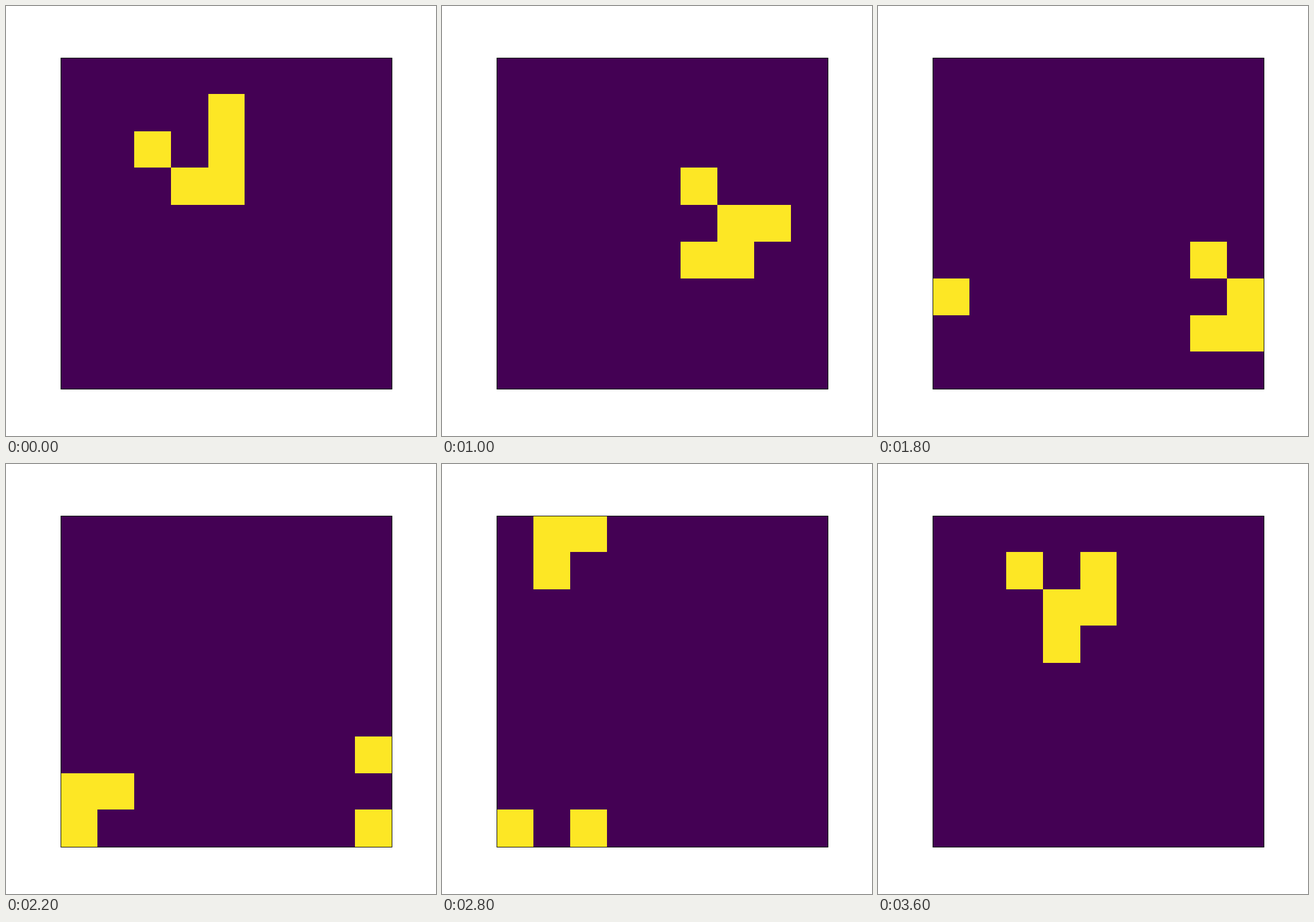
An HTML page for the animation above (3700 ms loop, 748x748 px).

```html
<!DOCTYPE html>
<html lang="en">
<head>
<meta charset="utf-8">
<title>Glider on a torus</title>
<style>
  html, body { margin: 0; width: 100%; height: 100%; overflow: hidden; background: #fff; }
  svg { display: block; width: 748px; height: 748px; }
</style>
</head>
<body>
<svg viewBox="0 0 748 748" shape-rendering="crispEdges">
  <rect x="95" y="90" width="577" height="577" fill="#000"/>
  <rect x="96" y="91" width="575" height="575" fill="#440154"/>
  <path id="cells" fill="#fde725"/>
</svg>
<script>
const SIZE = 9, STEP = 100, GENERATIONS = 36, LOOP = 3700;
const xs = [96, 159, 223, 287, 352, 415, 479, 543, 607, 671];
const ys = [91, 153, 218, 281, 346, 410, 474, 538, 601, 666];
const seed = [[1, 4], [2, 2], [2, 4], [3, 3], [3, 4]];
const cells = document.getElementById('cells');

const wrap = n => (n + SIZE) % SIZE;
const at = (grid, row, col) => grid[wrap(row) * SIZE + wrap(col)];

function evolve(grid) {
  return grid.map((alive, i) => {
    const row = Math.floor(i / SIZE), col = i % SIZE;
    let near = -alive;
    for (let dr = -1; dr <= 1; dr++)
      for (let dc = -1; dc <= 1; dc++) near += at(grid, row + dr, col + dc);
    return near === 3 || (alive && near === 2) ? 1 : 0;
  });
}

function toPath(grid) {
  return grid.map((alive, i) => {
    const row = Math.floor(i / SIZE), col = i % SIZE;
    return alive ? `M${xs[col]} ${ys[row]}H${xs[col + 1]}V${ys[row + 1]}H${xs[col]}Z` : '';
  }).join('');
}

let grid = Array(SIZE * SIZE).fill(0);
for (const [row, col] of seed) grid[row * SIZE + col] = 1;
const paths = [];
for (let g = 0; g < GENERATIONS; g++, grid = evolve(grid)) paths.push(toPath(grid));

// The first generation is held for two steps.
function draw(time) {
  const step = Math.floor((time % LOOP) / STEP);
  cells.setAttribute('d', paths[Math.max(0, step - 1)]);
}

const start = performance.now();
function tick() {
  draw(performance.now() - start);
  requestAnimationFrame(tick);
}
tick();
</script>
</body>
</html>
```
